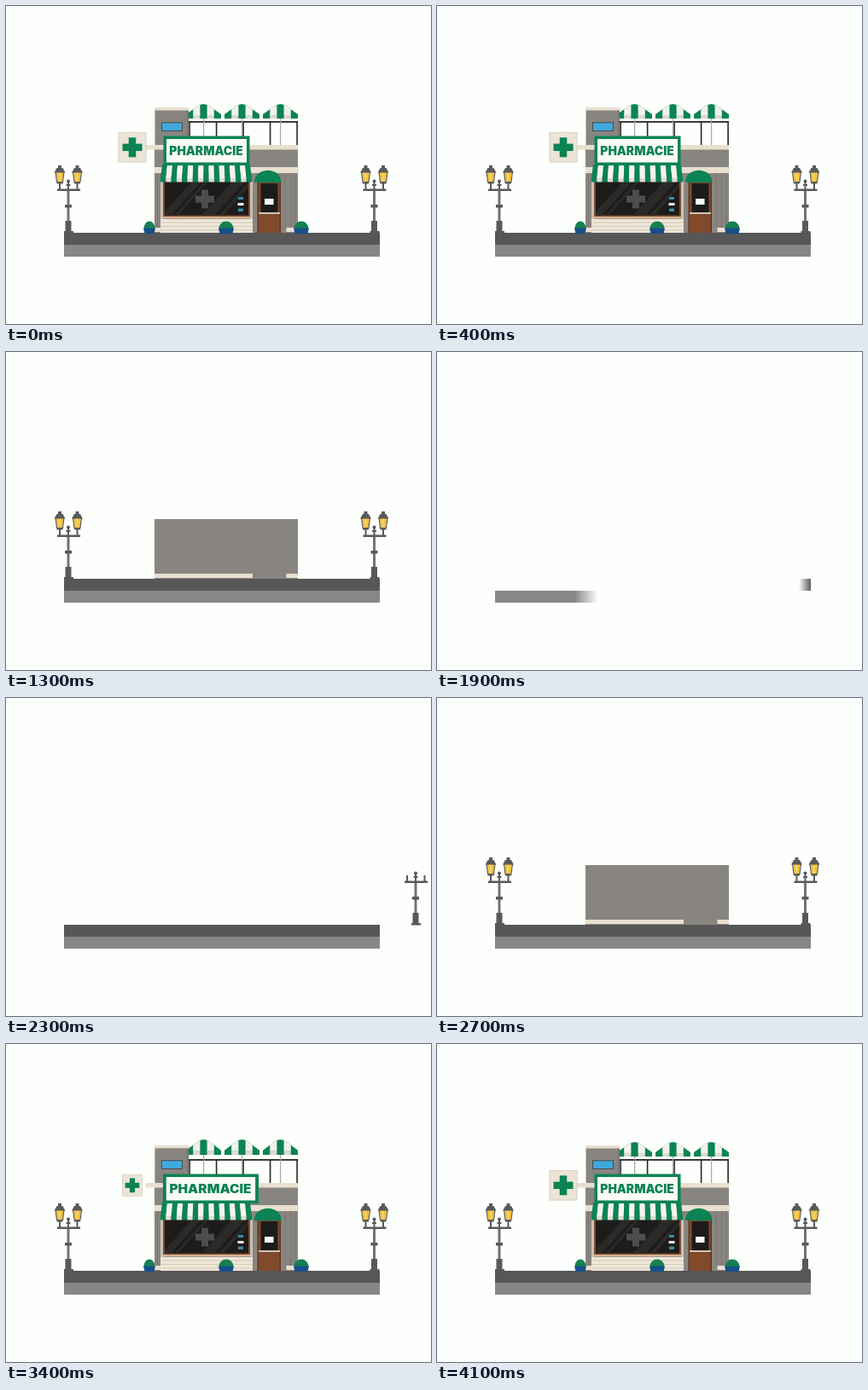
Animation, 498 px wide and 373 px high, one loop 4.2 s. Source, as an HTML page with a canvas:

```html
<!DOCTYPE html>
<html lang="fr">
<head>
<meta charset="utf-8">
<title>Pharmacie</title>
<style>
html, body { margin: 0; width: 100%; height: 100%; overflow: hidden; background: #fdfffc; }
canvas { display: block; width: 100vw; height: 100vh; }
</style>
</head>
<body>
<canvas id="stage" width="498" height="373"></canvas>
<script>
const ctx = document.getElementById('stage').getContext('2d');
const LOOP = 4200, STEP = 100, EMPTY_AT = 2000;
const BG = '#fdfffc', WALL = '#888581', WALL_DARK = '#787572', CREAM = '#e8dfcf';
const GREEN = '#0b8354', IRON = '#59595b', BROWN = '#804a2b', DARK = '#1d1c1b', BLUE = '#174f89';

const clamp = x => Math.max(0, Math.min(1, x));
const span = (u, start, length) => clamp((u - start) / length);
const easeOut = x => 1 - (1 - x) ** 3;
const easeInOut = x => x < .5 ? 4 * x ** 3 : 1 - 4 * (1 - x) ** 3;

// Scale that shoots past 1 and settles back.
function pop(u, start, length) {
  const x = span(u, start, length);
  if (x === 0 || x === 1) return x;
  return Math.max(0, 1 + 3.6 * (x - 1) ** 3 + 2.6 * (x - 1) ** 2);
}

function rect(color, left, top, right, bottom) {
  ctx.fillStyle = color;
  ctx.fillRect(left, top, right - left, bottom - top);
}

function shape(color, ...points) {
  ctx.fillStyle = color;
  ctx.beginPath();
  points.forEach(([x, y]) => ctx.lineTo(x, y));
  ctx.fill();
}

function scaled(x, y, sx, sy, draw) {
  if (sx <= 0 || sy <= 0) return;
  ctx.save();
  ctx.translate(x, y);
  ctx.scale(sx, sy);
  ctx.translate(-x, -y);
  draw();
  ctx.restore();
}

function plus(color, x, y, size, thick) {
  rect(color, x - thick / 2, y - size / 2, x + thick / 2, y + size / 2);
  rect(color, x - size / 2, y - thick / 2, x + size / 2, y + thick / 2);
}

// A bar wiped from one end, with a soft edge while it moves.
function wipeBar(color, from, to, top, x) {
  if (x === 0) return;
  const dir = Math.sign(to - from);
  const edge = from + (to - from) * easeInOut(x);
  if (x === 1) return rect(color, Math.min(from, to), top, Math.max(from, to), top + 14);
  const blur = 14 * Math.sin(Math.PI * x) * dir;
  const fade = ctx.createLinearGradient(edge - blur, 0, edge + blur, 0);
  fade.addColorStop(0, color);
  fade.addColorStop(1, BG);
  const end = edge + blur;
  rect(fade, Math.min(from, end), top, Math.max(from, end), top + 14);
}

function ground(u) {
  wipeBar('#878787', 68, 438, 280, span(u, 2000, 240));
  wipeBar('#575757', 438, 68, 266, span(u, 2060, 240));
}

function lantern(x) {
  shape('#f1c23c', [x - 4.5, 195], [x + 4.5, 195], [x + 3, 206], [x - 3, 206]);
  shape('#f7d467', [x - 1.5, 195], [x + 1, 195], [x + .5, 206], [x - 1, 206]);
  shape(IRON, [x - 6.5, 195.5], [x - 3.5, 190], [x + 3.5, 190], [x + 6.5, 195.5]);
  rect(IRON, x - 2, 187, x + 2, 190.5);
  shape(IRON, [x - 5.5, 195], [x - 4.3, 195], [x - 2.8, 207], [x - 4, 207]);
  shape(IRON, [x + 5.5, 195], [x + 4.3, 195], [x + 2.8, 207], [x + 4, 207]);
  rect(IRON, x - 3.5, 206, x + 3.5, 208.5);
}

function lamp(x, slideStart, side, u) {
  const slide = span(u, slideStart, 200);
  if (slide === 0) return;
  ctx.save();
  ctx.translate(side * 115 * (1 - easeOut(slide)), 0);
  rect(IRON, x - 13, 214.5, x + 14, 217);
  rect(IRON, x - 11, 208, x - 9, 215);
  rect(IRON, x + 9.5, 208, x + 11.5, 215);
  ctx.beginPath();
  ctx.arc(x, 205.5, 2, 0, 7);
  ctx.fill();
  rect(IRON, x - 1, 205, x + 1, 215);
  rect(IRON, x - 2.5, 209, x + 2.5, 211);
  rect('#737375', x - 1.5, 217, x + 1.5, 254);
  rect(IRON, x - 4, 233, x + 4, 236.5);
  rect(IRON, x - 3.5, 252, x + 3.5, 265);
  rect(IRON, x - 5, 264, x + 6, 266.5);
  ctx.restore();
  const grow = pop(u, 2440, 220);
  for (const dx of [-10, 10.5]) scaled(x + dx, 209, grow, grow, () => lantern(x + dx));
}

function block(u) {
  scaled(258, 266, 1, pop(u, 2380, 320), () => rect(WALL, 174, 196, 342, 266));
  const base = span(u, 2600, 100);
  scaled(258, 265, 1, base, () => {
    rect(CREAM, 174, 260, 289, 265);
    rect(CREAM, 328.5, 260, 342, 265);
  });
  const detail = span(u, 2720, 160);
  scaled(258, 266, 1, detail, () => {
    for (const x of [177, 181.5, 326.5, 333, 338]) rect(WALL_DARK, x, 196, x + 1, 260);
    rect('#c9c3b8', 181, 206, 185, 250);
    rect('#c9c3b8', 286, 206, 289, 250);
    rect('#eee6d8', 181, 250, 289, 266);
    for (const y of [253.5, 258, 262.5]) rect('#d6ccba', 181, y, 289, y + 1);
  });
  const bump = Math.max(0, 1 - Math.abs(u - 3300) / 100);
  scaled(258, 196, 1 + .05 * bump, pop(u, 2750, 250), () => {
    rect(WALL, 174, 168, 342, 189);
    rect(CREAM, 174, 189, 343, 196);
  });
  scaled(253, 166, easeOut(span(u, 2840, 240)), 1, () => rect(CREAM, 164, 163, 342, 168.5));
}

function shopWindow() {
  rect(BROWN, 184, 205, 286, 248);
  rect(DARK, 186, 206, 284, 245.5);
  ctx.save();
  ctx.beginPath();
  ctx.rect(186, 206, 98, 39.5);
  ctx.clip();
  for (const [x, w] of [[190, 11], [205, 4], [237, 15], [257, 5]])
    shape('#2b2a29', [x + 28, 206], [x + 28 + w, 206], [x + w - 8, 246], [x - 8, 246]);
  ctx.restore();
  plus('#4e4d4c', 233, 226.5, 22, 8);
  rect('#3f87a6', 272, 224, 278, 227);
  rect('#f3f3ef', 271.5, 231, 278.5, 234);
  rect('#3f87a6', 272, 237.5, 278, 241);
  rect('#d4b395', 183, 247, 287, 249.5);
}

function door() {
  rect('#5f3520', 294.5, 206, 322, 266);
  rect(BROWN, 296, 207, 320.5, 266);
  rect(DARK, 298.5, 208, 318.5, 243);
  rect('#f8f8f4', 303, 226, 313.5, 233);
  rect('#cfc5b9', 296, 242, 321, 244);
}

function awning() {
  const count = 17;
  const top = i => 183 + 103 * i / count;
  const low = i => 181 + 107 * i / count;
  for (let i = 0; i < count; i++) {
    const even = i % 2 === 0;
    shape(even ? GREEN : '#f5f4ed', [top(i), 186], [top(i + 1), 186], [low(i + 1), 202], [low(i), 202]);
    rect(even ? GREEN : '#dedcd3', low(i), 202, low(i + 1), 206.5);
  }
}

function doorAwning() {
  ctx.fillStyle = GREEN;
  ctx.beginPath();
  ctx.moveTo(291, 207);
  ctx.bezierCurveTo(291, 188, 322.5, 188, 322.5, 207);
  ctx.fill();
}

function tower() {
  rect(WALL, 174.5, 120, 214, 163);
  rect(WALL_DARK, 212, 122, 214, 163);
  rect(CREAM, 174, 119, 214.5, 122.5);
  rect('#4b4a4b', 182, 136.3, 207, 147);
  rect('#3fa9dc', 183, 137.3, 206, 146);
}

function railing() {
  rect('#262626', 214, 135, 342, 136.8);
  for (let i = 0; i < 5; i++) rect('#262626', 214.3 + 31.5 * i, 135, 215.9 + 31.5 * i, 163);
}

// Straight stripes cut to the outline of the canopy.
function parasol(x) {
  const w = 20.5;
  rect('#a7a7a4', x - .5, 131, x + .7, 163);
  ctx.save();
  ctx.beginPath();
  for (const [dx, y] of [[-w, 132], [-w, 127], [-5, 116], [0, 115], [5, 116], [w, 127], [w, 132]])
    ctx.lineTo(x + dx, y);
  ctx.clip();
  rect(GREEN, x - w, 115, x + w, 132);
  for (const dx of [-8.2, 8.2]) {
    rect('#f2f2eb', x + dx - 4.1, 115, x + dx + 4.1, 128);
    rect('#dadad2', x + dx - 4.1, 128, x + dx + 4.1, 132);
  }
  ctx.restore();
}

function terrace(u) {
  scaled(278, 163, 1, pop(u, 3100, 260), railing);
  const open = pop(u, 3236, 200);
  for (const x of [231.5, 276.5, 321.5]) scaled(x, 163, Math.min(1, open), open, () => parasol(x));
  const size = pop(u, 3180, 230);
  scaled(194.5, 163, size, size, tower);
}

function sign() {
  rect(GREEN, 184.5, 152.5, 285.5, 187);
  rect('#fbfcf7', 188, 156, 282, 183.5);
  ctx.fillStyle = GREEN;
  ctx.font = '900 13.9px Inter, "Open Sans", sans-serif';
  ctx.textAlign = 'center';
  ctx.fillText('PHARMACIE', 234.5, 175);
}

// While unrolling, the free end of the sign is smeared into the wall.
function unrollingSign(u) {
  const stretch = pop(u, 3281, 160);
  scaled(190, 170, stretch, 1, () => {
    sign();
    if (stretch >= 1) return;
    const smear = ctx.createLinearGradient(240, 0, 285.5, 0);
    smear.addColorStop(0, 'rgba(205,208,202,0)');
    smear.addColorStop(1, 'rgba(175,176,171,.9)');
    rect(smear, 240, 152.5, 285.5, 187);
  });
}

function crossSign() {
  rect('#d3cab9', 131.5, 148, 164.5, 183.5);
  rect('#ece5d7', 132.3, 148.8, 163.7, 182.7);
  plus(GREEN, 148, 165.8, 23, 8.5);
}

function planter(x, half) {
  ctx.fillStyle = '#14814f';
  ctx.beginPath();
  ctx.ellipse(x, 261, half - .5, 8.5, 0, Math.PI, 0);
  ctx.fill();
  shape(BLUE, [x - half, 260.5], [x + half, 260.5], [x + half - 1.5, 267], [x - half + 1.5, 267]);
}

function draw(time) {
  // The build plays forward from the empty stage and backward towards it.
  const u = EMPTY_AT + Math.abs(time - EMPTY_AT);
  rect(BG, 0, 0, 498, 373);
  ground(u);
  lamp(73, 2350, -1, u);
  lamp(431.5, 2250, 1, u);
  block(u);
  const glass = pop(u, 2760, 260);
  scaled(235, 248, glass, glass, shopWindow);
  scaled(308, 266, 1, pop(u, 2800, 260), door);
  terrace(u);
  scaled(235, 186, 1, pop(u, 2960, 260), awning);
  const hood = pop(u, 3289, 120);
  scaled(308, 193, hood, Math.min(1, hood * 2), doorAwning);
  unrollingSign(u);
  const cross = pop(u, 3358, 250);
  scaled(148, 165.8, cross, cross, crossSign);
  [[168, 7], [258, 9], [346, 9]].forEach(([x, half], i) => {
    const size = pop(u, 3040 + 40 * i, 240);
    scaled(x, 267, size, size, () => planter(x, half));
  });
}

const started = performance.now();
function tick() {
  const time = (performance.now() - started) % LOOP;
  draw(Math.floor(time / STEP) * STEP);
  requestAnimationFrame(tick);
}
tick();
</script>
</body>
</html>
```
